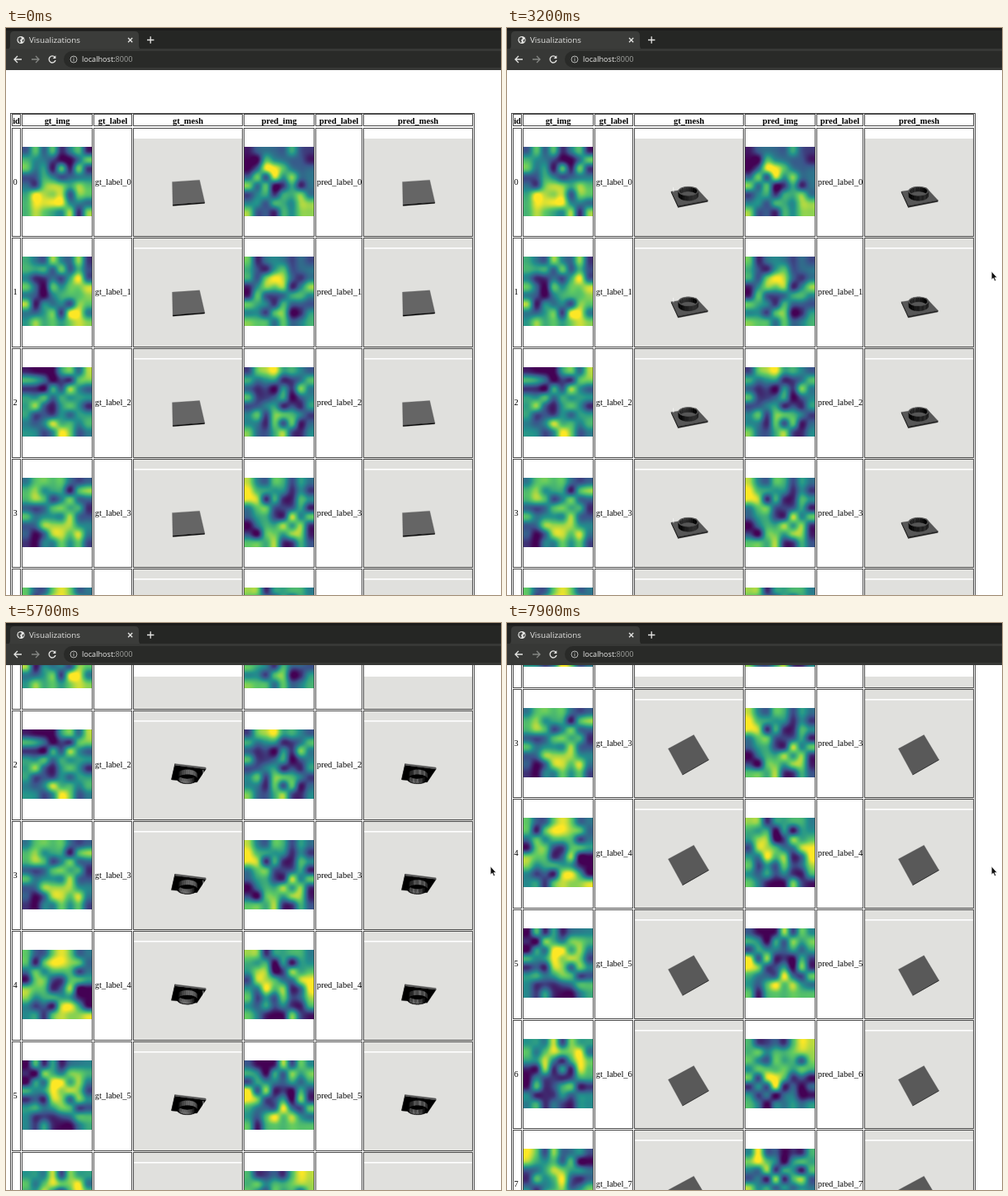
Animation, 600 px wide and 687 px high, one loop 8 s. Source, as an HTML page with a canvas:

```html
<!DOCTYPE html>
<html lang="en">
<head>
<meta charset="utf-8">
<title>Visualizations</title>
<style>
html, body { margin: 0; width: 100%; height: 100%; overflow: hidden; background: #fff; }
#stage { position: relative; width: 600px; height: 687px; overflow: hidden; background: #fff; }
#scene, #bar, #cursor { position: absolute; left: 0; top: 0; }
#page { position: absolute; left: 0; top: 51px; width: 600px; height: 636px; overflow: hidden; }
#table { position: absolute; left: 0; top: 0; font: 10.45px/12px "Liberation Serif", "Times New Roman", serif; color: #000; }
.box { position: absolute; box-sizing: border-box; border: 1px solid #4a4a4a; }
.text { position: absolute; white-space: pre; }
.head { font-weight: bold; text-align: center; }
#table canvas { position: absolute; }
</style>
</head>
<body>
<div id="stage">
  <canvas id="scene" width="600" height="687"></canvas>
  <div id="page"><div id="table"></div></div>
  <svg id="bar" width="600" height="51" font-family="'Open Sans', 'Noto Sans', sans-serif">
    <rect width="600" height="51" fill="#252624"/>
    <rect width="600" height="3" fill="#1c1c1b"/>
    <path d="M1 26Q5 26 5 21V9Q5 4 10 4H156Q161 4 161 9V21Q161 26 165 26Z" fill="#3b3c3a"/>
    <rect y="25" width="600" height="26" fill="#373836"/>
    <rect x="70" y="28" width="560" height="20" rx="10" fill="#292a28"/>
    <circle cx="18" cy="14.5" r="4.6" fill="#e6e6e4"/>
    <path d="M15 12L18 11L19 13L17 14.5L18 17L16.5 18L14.5 15ZM20 14L22 13.5L21 17L19.5 16Z" fill="#454644"/>
    <text x="28" y="18" font-size="9.8" fill="#e4e4e2">Visualizations</text>
    <g fill="none" stroke="#e4e4e2" stroke-width="1.3">
      <path d="M148 12L153.2 17.2M153.2 12L148 17.2"/>
      <path d="M171 14.5H179.4M175.2 10.3V18.7"/>
      <path d="M19 38H10M14 34L10 38L14 42"/>
      <path d="M31 38H40M36 34L40 38L36 42" stroke="#858684"/>
      <path d="M59.2 35.4A4 4 0 1 0 60 39"/>
      <path d="M60.3 33.2V36.9H56.6Z" fill="#e4e4e2" stroke="none"/>
      <g stroke="#b4b5b3" stroke-width="1"><circle cx="82" cy="38" r="4"/><path d="M82 37.2V40.3M82 35.4V36.4"/></g>
    </g>
    <text x="92" y="41.3" font-size="9.1" fill="#ececea">localhost:<tspan fill="#a2a3a0">8000</tspan></text>
  </svg>
  <svg id="cursor" width="9" height="15">
    <path d="M.7 .7V11L3 9L4.6 12.6L6.3 11.9L4.8 8.4H7.6Z" fill="#111" stroke="#fff" stroke-width=".7"/>
  </svg>
</div>
<script>
const LOOP = 8000, STEP = 100, ROWS = 8, PITCH = 133.67;
const VIEW_TOP = 65, RECT_TOP = 134;
const table = document.getElementById('table');
const cursor = document.getElementById('cursor');
const ctx = document.getElementById('scene').getContext('2d');

// Timelines: [ms, value...]
const scrollKeys = [[0, 0], [3800, 0], [4000, 45], [4500, 212], [4700, 251], [5000, 274], [5400, 282],
  [6300, 282], [6500, 325.5], [6900, 375], [7300, 402], [7900, 442]];
const cursorKeys = [[700, 570, 304], [900, 574, 300], [1200, 588, 292], [1500, 586.5, 294], [8000, 586.5, 294]];

function at(keys, t, k = 1) {
  const i = keys.findIndex(key => key[0] > t);
  if (i < 0) return keys[keys.length - 1][k];
  if (i === 0) return keys[0][k];
  const p = keys[i - 1], q = keys[i];
  return p[k] + (q[k] - p[k]) * (t - p[0]) / (q[0] - p[0]);
}

// ---- Table ----
const columns = [
  ['id', 7, 18], ['gt_img', 19, 105], ['gt_label', 106, 153], ['gt_mesh', 154, 287],
  ['pred_img', 288, 374], ['pred_label', 375, 432], ['pred_mesh', 433, 566]
];

function add(cls, x, y, w, h, text) {
  const el = document.createElement('div');
  el.className = cls;
  el.style.cssText = `left:${x}px;top:${y - 51}px;width:${w}px;height:${h}px`;
  if (text) el.textContent = text;
  table.append(el);
}

// Bright and dark spots of each heat map on a 10 x 10 grid
const spots = {
  gt_img: [
    { hot: [[1, 7], [5, 7], [2, 9]], cold: [[6, 1]] },
    { hot: [[7, 3], [8, 8]], cold: [[2, 4]] },
    { hot: [[5, 9], [9, 0]], cold: [[3, 1]] },
    { hot: [[3, 0], [6, 7]], cold: [[1, 9]] },
    { hot: [[4, 1], [7, 9]], cold: [[9, 6]] },
    { hot: [[4, 3], [5, 5]], cold: [[0, 1], [7, 9]] },
    { hot: [[3, 1], [8, 2]], cold: [[0, 5]] },
    { hot: [[1, 0], [5, 3]], cold: [[9, 1]] }
  ],
  pred_img: [
    { hot: [[4, 3]], cold: [[0, 1], [4, 5]] },
    { hot: [[4, 3]], cold: [[7, 7]] },
    { hot: [[3, 0]], cold: [[4, 3], [7, 5]] },
    { hot: [[0, 1], [7, 7]], cold: [[1, 7]] },
    { hot: [[9, 4], [2, 4]], cold: [[4, 1], [4, 8]] },
    { hot: [[0, 5], [5, 8]], cold: [[6, 4], [2, 0]] },
    { hot: [[9, 1], [3, 5]], cold: [[8, 6], [3, 9]] },
    { hot: [[1, 0]], cold: [[5, 1]] }
  ]
};
const viridis = [[68, 1, 84], [59, 82, 139], [33, 145, 140], [94, 201, 98], [253, 231, 37]];
const clamp = (v, lo, hi) => Math.max(lo, Math.min(hi, v));

function random(seed) {
  return () => {
    seed = (seed * 1664525 + 1013904223) >>> 0;
    return seed / 4294967296;
  };
}

// Catmull-Rom curve through equally spaced samples
function spline(sample, p) {
  const i = Math.floor(p), f = p - i;
  const [a, b, c, d] = [i - 1, i, i + 1, i + 2].map(sample);
  return b + f / 2 * (c - a + f * (2 * a - 5 * b + 4 * c - d + f * (3 * (b - c) + d - a)));
}

function heatMap(seed, { hot, cold }) {
  const N = 8, S = 84, rnd = random(seed);
  const near = (list, x, y) => list.reduce((s, [u, v]) => s + Math.exp(-((x - u) ** 2 + (y - v) ** 2) / 1.8), 0);
  const grid = Array.from({ length: N * N }, (_, i) => {
    const x = (i % N) * 9 / (N - 1), y = Math.floor(i / N) * 9 / (N - 1);
    return clamp(0.47 + (rnd() - 0.5) * 0.8 + 0.6 * (near(hot, x, y) - near(cold, x, y)), 0, 1);
  });
  const place = p => (p + 0.5) * N / S - 0.5;
  const cell = (i, j) => grid[clamp(j, 0, N - 1) * N + clamp(i, 0, N - 1)];
  const canvas = document.createElement('canvas');
  canvas.width = canvas.height = S;
  const c = canvas.getContext('2d'), img = c.createImageData(S, S);
  for (let y = 0; y < S; y++) for (let x = 0; x < S; x++) {
    const v = 4 * clamp(spline(j => spline(i => cell(i, j), place(x)), place(y)), 0, 1);
    const k = Math.min(3, Math.floor(v)), o = (y * S + x) * 4;
    for (let ch = 0; ch < 3; ch++) img.data[o + ch] = viridis[k][ch] + (viridis[k + 1][ch] - viridis[k][ch]) * (v - k);
    img.data[o + 3] = 255;
  }
  c.putImageData(img, 0, 0);
  return canvas;
}

function buildTable() {
  add('box', 5, 103, 563, 1400);
  for (const [name, l, r] of columns) {
    add('box', l, 104, r - l, 15);
    add('text head', l - 2, 106.5, r - l + 4, 12, name);
  }
  const rowTop = i => Math.round(120.6 + i * PITCH);
  for (let i = 0; i < ROWS; i++) {
    const y = rowTop(i);
    columns.forEach(([name, l, r], k) => {
      add('box', l, y, r - l, rowTop(i + 1) - y - 1);
      if (name === 'id') add('text', l + 1.5, y + 60, 9, 12, String(i));
      if (name.endsWith('label')) add('text', l + 1.7, y + 60, 56, 12, `${name}_${i}`);
      if (name.endsWith('img')) {
        const map = heatMap(i * 977 + k * 131 + 7, spots[name][i]);
        map.style.left = (k === 1 ? 20 : 289) + 'px';
        map.style.top = y + 23 - 51 + 'px';
        table.append(map);
      }
    });
  }
}

// ---- Mesh: a square plate with an open ring under it ----
const EYE = 142, HALF = 17.5, TOP = 4.5, BASE = 2.5, END = -4;
const LIGHT = [0.3, 0.55, 0.78];

function plateFaces() {
  const h = HALF, c = [[-h, -h], [h, -h], [h, h], [-h, h]];
  const flat = (y, n) => ({ pts: c.map(([x, z]) => [x, y, z]), n: [0, n, 0], tone: 1 });
  const sides = c.map(([x, z], i) => {
    const [u, w] = c[(i + 1) % 4];
    return { pts: [[x, TOP, z], [u, TOP, w], [u, BASE, w], [x, BASE, z]], n: [(x + u) / 2 / h, 0, (z + w) / 2 / h], tone: 0.8 };
  });
  return [flat(TOP, 1), flat(BASE, -1), ...sides];
}

function ringFaces(count, striped) {
  const inner = [], outer = [], rim = [], R = 12, r = 10.8;
  for (let i = 0; i < count; i++) {
    const p = i / count * 2 * Math.PI, q = (i + 1) / count * 2 * Math.PI, m = (p + q) / 2;
    const on = (rad, ang, y) => [rad * Math.cos(ang), y, rad * Math.sin(ang)];
    const wall = rad => [on(rad, p, BASE), on(rad, q, BASE), on(rad, q, END), on(rad, p, END)];
    const tone = striped && i % 2 ? 0.7 : 1;
    inner.push({ pts: wall(r), n: on(-1, m, 0), tone });
    outer.push({ pts: wall(R), n: on(1, m, 0), tone });
    rim.push({ pts: [on(R, p, END), on(R, q, END), on(r, q, END), on(r, p, END)], n: [0, -1, 0], tone: 1 });
  }
  return [...inner, ...outer, ...rim];
}

const plate = plateFaces();
const meshes = [
  { cx: 219.8, left: 155, ring: ringFaces(32, false), pin: true },
  { cx: 498.8, left: 434, ring: ringFaces(26, true), pin: false }
];

function turner(a, b) {
  const ca = Math.cos(a), sa = Math.sin(a), cb = Math.cos(b), sb = Math.sin(b);
  return ([x, y, z]) => {
    const depth = z * cb - x * sb;
    return [x * cb + z * sb, y * ca - depth * sa, y * sa + depth * ca];
  };
}

function project([x, y, z]) {
  const k = EYE / (EYE - z);
  return [x * k, -y * k];
}

// Visible faces as flat shaded polygons around the mesh centre
function shade(faces, turn) {
  const shapes = [];
  for (const { pts, n, tone } of faces) {
    const p = pts.map(turn), m = turn(n);
    if (m[0] * -p[0][0] + m[1] * -p[0][1] + m[2] * (EYE - p[0][2]) <= 0) continue;
    const lit = Math.max(0, m[0] * LIGHT[0] + m[1] * LIGHT[1] + m[2] * LIGHT[2]);
    const g = Math.round(108 * lit ** 1.35 * tone);
    shapes.push({ pts: p.map(project), color: `rgb(${g},${g},${g})` });
  }
  return shapes;
}

function trace(pts) {
  ctx.beginPath();
  pts.forEach(([x, y]) => ctx.lineTo(x, y));
}

function paint(shapes) {
  for (const { pts, color } of shapes) {
    trace(pts);
    ctx.closePath();
    ctx.fillStyle = ctx.strokeStyle = color;
    ctx.lineWidth = 0.3;
    ctx.fill();
    ctx.stroke();
  }
}

function drawScene(t, scroll) {
  const rad = Math.PI / 180;
  const tilt = (51 + 0.0492 * t) * rad, spin = (95.5 + 0.0486 * t) * rad;
  const turn = turner(tilt, spin);
  const ringInFront = EYE * Math.sin(tilt) < BASE;
  const plateShapes = shade(plate, turn);
  const pin = [[15, BASE, 15], [15, END, 15]].map(p => project(turn(p)));

  ctx.clearRect(0, 0, 600, 687);
  ctx.save();
  ctx.beginPath();
  ctx.rect(0, VIEW_TOP, 600, 687 - VIEW_TOP);
  ctx.clip();
  for (const mesh of meshes) {
    const ringShapes = shade(mesh.ring, turn);
    const drawRing = () => {
      paint(ringShapes);
      if (!mesh.pin) return;
      trace(pin);
      ctx.strokeStyle = 'rgba(255,255,255,.85)';
      ctx.lineWidth = 0.8;
      ctx.stroke();
    };
    const first = Math.round(RECT_TOP - scroll);
    ctx.fillStyle = '#e0e0dd';
    ctx.fillRect(mesh.left, first, 132, 1200);
    for (let i = 0; i < ROWS; i++) {
      const y = RECT_TOP + i * PITCH - scroll;
      const line = Math.round(y - 1.3);
      if (i && line > 79) {
        ctx.fillStyle = '#fff';
        ctx.fillRect(mesh.left, line, 132, 1.6);
      }
      if (y < -80 || y > 687) continue;
      ctx.save();
      ctx.translate(mesh.cx, y + 66.8);
      if (ringInFront) { paint(plateShapes); drawRing(); }
      else { drawRing(); paint(plateShapes); }
      ctx.restore();
    }
  }
  ctx.restore();
}

function render(t) {
  const scroll = at(scrollKeys, t);
  table.style.transform = `translateY(${-Math.round(scroll)}px)`;
  cursor.style.visibility = t < cursorKeys[0][0] ? 'hidden' : 'visible';
  cursor.style.transform = `translate(${at(cursorKeys, t, 1)}px, ${at(cursorKeys, t, 2)}px)`;
  drawScene(t, scroll);
}

buildTable();
const start = performance.now();
let shown = -1;
function tick() {
  const t = Math.floor((performance.now() - start) % LOOP / STEP) * STEP;
  if (t !== shown) render(shown = t);
  requestAnimationFrame(tick);
}
tick();
</script>
</body>
</html>
```
